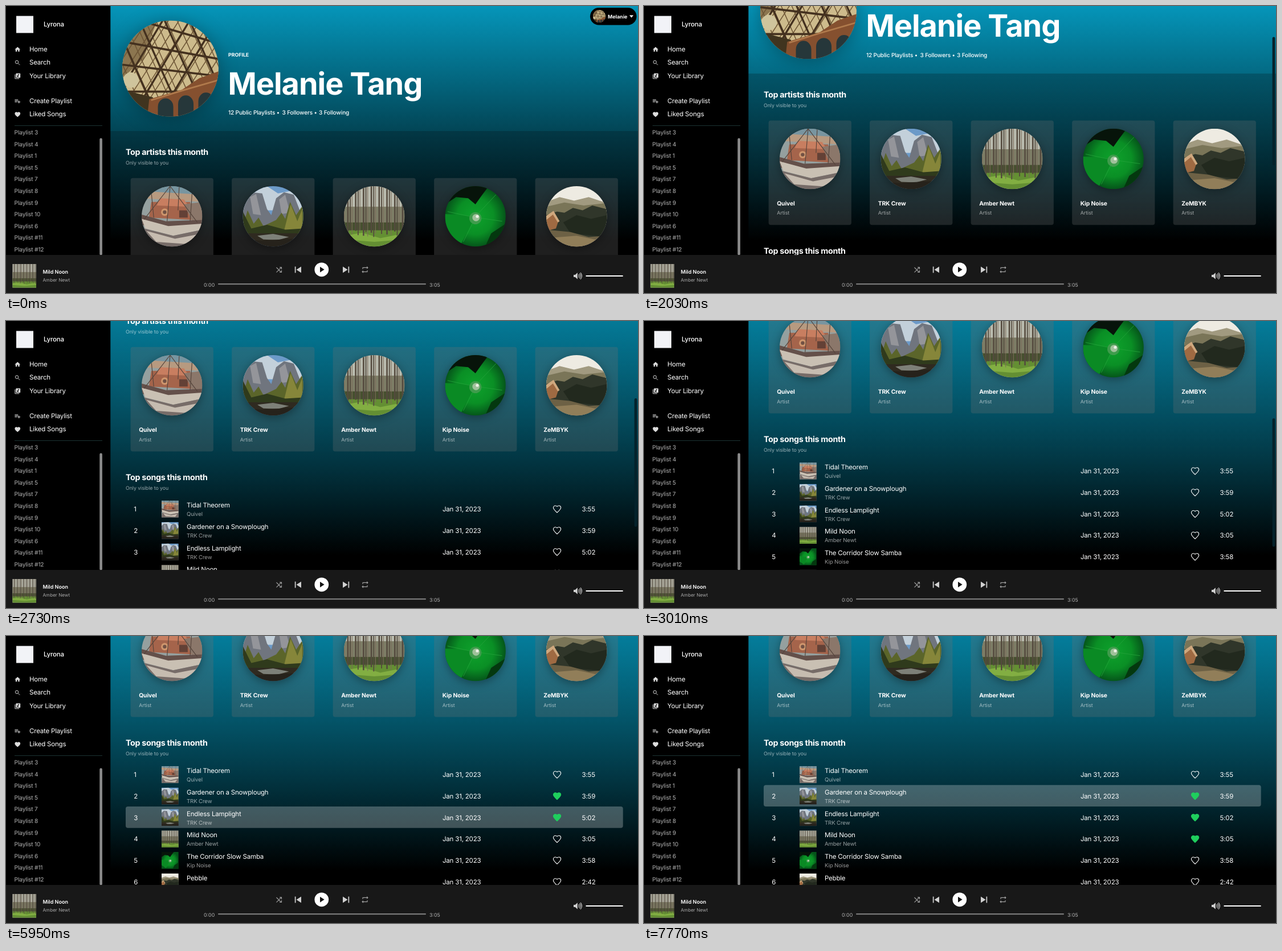
An HTML page that plays this animation: 1109 px wide and 505 px high, repeating every 8 s.

```html
<!DOCTYPE html>
<html lang="en">
<head>
<meta charset="utf-8">
<title>Music profile</title>
<style>
  html, body { margin: 0; width: 100%; height: 100%; overflow: hidden; background: #000; }
  svg { display: block; width: 1109px; height: 505px; }
  text { font-family: Inter, "Noto Sans", sans-serif; text-rendering: geometricPrecision; white-space: pre; }
  .soft { filter: drop-shadow(0 4px 8px rgba(0,0,0,.35)); }
  .wide { filter: drop-shadow(0 3px 16px rgba(0,0,0,.3)); }
</style>
</head>
<body>
<svg id="stage" viewBox="0 0 1109 505"></svg>
<script>
const DIM = '#ffffff99';
const HEART = 'M12 21.35l-1.45-1.32C5.4 15.36 2 12.28 2 8.5 2 5.42 4.42 3 7.5 3c1.74 0 3.41.81 4.5 2.09C13.09 3.81 14.76 3 16.5 3 19.58 3 22 5.42 22 8.5c0 3.78-3.4 6.86-8.55 11.54z';
const ROW = 37.75, LIST_TOP = 569.2;

const range = (n, f) => Array.from({ length: n }, (_, i) => f(i)).join('');
const rect = (x, y, w, h, fill, rx = 0) =>
  `<rect x="${x}" y="${y}" width="${w}" height="${h}" fill="${fill}" rx="${rx}"/>`;
const disc = (x, y, r, fill) => `<circle cx="${x}" cy="${y}" r="${r}" fill="${fill}"/>`;
const path = (d, fill) => `<path d="${d}" fill="${fill}"/>`;
const line = (d, stroke, width) => `<path d="${d}" fill="none" stroke="${stroke}" stroke-width="${width}"/>`;
const text = (x, y, s, size = 11.5, gap = -.2, weight = 400, fill = '#fff') =>
  `<text x="${x}" y="${y}" font-size="${size}" letter-spacing="${gap}" font-weight="${weight}" fill="${fill}">${s}</text>`;
const at = (x, y, scale, body) => `<g transform="translate(${x} ${y}) scale(${scale})">${body}</g>`;
const pic = (id, x, y, size, clip = 'round') =>
  `<g transform="translate(${x} ${y}) scale(${size / 100})" clip-path="url(#${clip})"><use href="#${id}"/></g>`;

// Simplified pictures, each on a 100 x 100 field
const pictures = {
  bridge: rect(0, 0, 100, 100, '#cdbb8c') + path('M0 0H36L22 40 0 60z', '#8c7650') +
    range(12, i => line(`M${i * 11 - 20} 0L${i * 11 + 18} 86M${i * 11 + 4} 0L${i * 11 - 50} 84`, '#6d5535', .9)) +
    range(4, i => line(`M${i * 26 - 8} 0L${i * 26 + 30} 86M${i * 28 + 14} 0L${i * 28 - 36} 84`, '#44311f', 2)) +
    line('M0 22L100 40M0 46L100 58M18 0L100 24M0 74L62 74', '#44311f', 2.2) +
    disc(9, 62, 8, '#cfc49c') + path('M0 72L32 80 30 100H0z', '#40341f') +
    path('M28 82L62 72 80 60 100 53V100H26z', '#85502f') + line('M30 83L62 73 100 62', '#b07a4c', 1.6) +
    [45, 66, 87].map((x, i) => path(`M${x - 8} 100V${90 - i * 3}a8 9 0 0 1 16 0V100z`, '#26373a')).join(''),
  boat: rect(0, 0, 100, 100, '#95a09f') + rect(0, 0, 100, 18, '#7895a0') +
    path('M0 8L100 14V26L0 20z', '#b79a80') + path('M16 26H80L86 56 12 52z', '#a5644b') +
    path('M30 20L70 22 78 34 25 32z', '#c87e60') + rect(62, 40, 14, 12, '#634136') +
    disc(38, 43, 6, '#cf966d') + disc(38, 43, 3, '#715144') +
    path('M70 30L100 26V56L84 60z', '#8b776a') +
    path('M0 47L40 58 100 56V70L60 78 0 64z', '#64504a') + path('M0 54L44 66 100 62V72L52 82 6 70z', '#c9c0b3') +
    path('M4 70L52 82 100 72V100H0z', '#776c68') + path('M8 74L55 87 92 80 80 96 24 92z', '#c6bcb0') +
    line('M47 0L42 58M15 0L20 52M84 0L80 58M47 0L92 60M47 0L4 55M62 0L60 40', '#55443b', 1.1),
  valley: rect(0, 0, 100, 100, '#6c9ac8') + path('M0 4L40 0 58 12 88 6 100 22V40H0z', '#c3d0da') +
    path('M0 22L14 10 32 12 40 38 47 48 55 20 68 10 84 14 94 40V66H0z', '#70757e') +
    path('M12 18L22 13 30 48 17 46zM60 22L70 14 78 44 64 46z', '#94959a') +
    path('M0 66L8 40 18 62 26 52 34 66 55 56 64 44 70 54 78 26 88 48 100 30V78H0z', '#5b652a') +
    path('M68 74L79 30 90 58 98 38V80z', '#86863a') + path('M0 42L14 70 40 64 70 72 100 70V84H0z', '#2f3a1c') +
    rect(0, 78, 100, 22, '#2f2a20') + path('M24 82L50 79 76 84 58 89 34 88z', '#7d8078') +
    path('M0 88L30 90 100 86V100H0z', '#26221b'),
  forest: rect(0, 0, 100, 100, '#b9bbae') + rect(0, 34, 100, 40, '#7d7d66') + rect(0, 60, 100, 14, '#46502f') +
    rect(0, 73, 100, 27, '#648f33') + path('M0 82L30 77 60 86 100 78V88L50 92 0 88z', '#82ae42') +
    range(24, i => rect(i * 4.3 + i * i % 3, 0, 1 + i * 5 % 3 * .7, 72 + i * 7 % 13, i % 3 ? '#544a3e' : '#7b6b5a')),
  leaf: rect(0, 0, 100, 100, 'url(#lush)') + path('M0 0H72L60 16 50 30 38 20 18 18 0 30z', '#07140a') +
    path('M50 50L0 46V78L26 96z', '#0a8a24') + path('M100 62L76 78 66 100H100z', '#04380f') +
    line('M50 50L84 14M50 52L4 42M50 52L30 92M52 52L94 58', '#24a23a', .8) +
    disc(50, 53, 10, '#3f9c4c') + disc(51, 52, 6, '#9fc19a') + disc(53, 50, 2.4, '#edf2e6'),
  hills: rect(0, 0, 100, 100, '#eeebe2') + path('M0 26L22 18 46 24 70 18 100 28V60H0z', '#a19a80') +
    path('M0 34L30 27 62 32 100 28V60H0z', '#7a7558') +
    path('M0 48L18 42 30 44 44 36 60 40 76 32 100 38V86H0z', '#30362a') +
    path('M28 60L50 48 74 54 100 48V84L40 78z', '#22291e') +
    path('M0 72L40 76 70 84 100 82V100H0z', '#6d6145') + path('M0 86L50 82 100 92V100H0z', '#917e59') +
    path('M0 52L12 44 20 58 16 70 0 74z', '#9f6a42') + path('M0 49L12 41 22 58 19 60 11 47 0 56z', '#cfa87e')
};

const artists = [['Quivel', 'boat'], ['TRK Crew', 'valley'], ['Amber Newt', 'forest'], ['Kip Noise', 'leaf'], ['ZeMBYK', 'hills']];
// title, artist index, length, time of the like
const songs = [
  ['Tidal Theorem', 0, '3:55'], ['Gardener on a Snowplough', 1, '3:59', 4900],
  ['Endless Lamplight', 1, '5:02', 5950], ['Mild Noon', 2, '3:05', 7210],
  ['The Corridor Slow Samba', 3, '3:58'], ['Pebble', 4, '2:42']
];

const card = ([name, photo], i) => {
  const x = 218.6 + i * 177.5;
  return rect(x, 302.7, 145.3, 183.7, 'rgba(112,112,112,.28)', 4) +
    `<g class="soft">${pic(photo, x + 19.4, 317, 106.4)}</g>` +
    text(x + 14.6, 452, name, 10.3, -.1, 700) + text(x + 14.6, 468.6, 'Artist', 8.8, 0, 400, DIM);
};

const songRow = ([title, artist, length], i) => {
  const y = LIST_TOP + i * ROW, [name, photo] = artists[artist];
  return `<rect class="glow" x="210" y="${y - .7}" width="872.7" height="${ROW}" rx="4" fill="#fff" opacity="0"/>` +
    text(224.3, y + 22.8, i + 1) + pic(photo, 273, y + 3.8, 29.8, 'square') +
    text(317, y + 15.8, title) + text(317, y + 30.8, name, 9.6, -.1, 400, DIM) +
    text(766, y + 22.8, 'Jan 31, 2023') +
    at(959.1, y + 10.8, .66, `<path class="heart" d="${HEART}" stroke-width="1.7"/>`) +
    text(1010.6, y + 22.8, length);
};

const page =
  rect(183, 220, 926, 562, 'url(#veil)') +
  `<g class="wide">${pic('bridge', 204, 25.5, 169)}</g>` +
  text(390, 88.7, 'PROFILE', 8.8, 0, 700) +
  text(389.5, 155.5, 'Melanie Tang', 54, -1, 700) +
  text(390, 191.2, '12 Public Playlists •', 10.1, -.16, 500) +
  text(484.5, 191.2, '3 Followers •', 10.1, -.16, 500) + text(549, 191.2, '3 Following', 10.1, -.16, 500) +
  rect(1025, 3, 81.5, 30.6, '#000', 15.3) + pic('bridge', 1030, 7, 22) +
  text(1056, 21.7, 'Melanie', 8.9, 0, 700) + path('M1094 16.3h7l-3.5 4.2z', '#fff') +
  text(210, 262.4, 'Top artists this month', 14.3, -.32, 700) +
  text(210, 279.4, 'Only visible to you', 8.8, -.06, 400, DIM) +
  artists.map(card).join('') +
  text(210, 537, 'Top songs this month', 14.3, -.32, 700) +
  text(210, 554.2, 'Only visible to you', 8.8, -.06, 400, DIM) +
  songs.map(songRow).join('');

const icons = [
  path('M10 20v-6h4v6h5v-8h3L12 3 2 12h3v8z', '#ddd'),
  line('M14.5 14.5L20 20M15 9.5a5.5 5.5 0 1 0-11 0a5.5 5.5 0 1 0 11 0', '#ddd', 2),
  rect(6, 2, 16, 16, '#ddd', 2) + line('M3 6V21H18', '#ddd', 2) + disc(12.5, 12.5, 2.5, '#000') + line('M14 12.5V6H18', '#000', 2),
  line('M2 7H14M2 11H14M2 15H10M17 10V20M12 15H22', '#ddd', 2),
  path(HEART, '#ddd')
];
const menu = ['Home', 'Search', 'Your Library', 'Create Playlist', 'Liked Songs'];
const menuY = [75.5, 99, 122.5, 166.5, 190];
const playlists = ['3', '4', '1', '5', '7', '8', '9', '10', '6', '#11', '#12'];

const sidebar =
  rect(0, 0, 183.3, 438, '#000') + rect(18, 17.5, 30, 30, '#f2f3f7') + text(66, 36, 'Lyrona', 11.5, -.2, 500) +
  menu.map((s, i) => at(14.4, menuY[i] - 5, .49, icons[i]) + text(41, menuY[i] + 4, s)).join('') +
  rect(15, 210, 154, .8, '#24403f') +
  playlists.map((s, i) => text(14.6, 226.2 + i * 20.55, 'Playlist ' + s, 10.2, -.15, 400, '#b3b3b3')).join('') +
  rect(164.3, 232.5, 4.6, 206, '#8b8b8b', 2.3);

const player =
  rect(0, 438, 1109, 67, '#181818') + pic('forest', 11.3, 454, 41.8, 'square') +
  text(64.5, 471.2, 'Mild Noon', 9.1, 0, 600) + text(64.5, 485.4, 'Amber Newt', 8.1, 0, 400, '#aaa') +
  line('M474.5 460L483 468.6M474.5 468.6L483 460M480 459.7h3.5v3.5M480 468.5h3.5v-3.5', '#a0a0a0', 1.1) +
  rect(506.8, 458.5, 1.7, 11, '#d0d0d0') + path('M518 458.5v11l-8.5-5.5z', '#d0d0d0') +
  disc(553.8, 463.8, 12.4, '#fff') + path('M551 458.8v10l7.6-5z', '#111') +
  path('M591 458.5v11l8.5-5.5z', '#d0d0d0') + rect(600.5, 458.5, 1.7, 11, '#d0d0d0') +
  line('M626 463v-2.6h8.3M634 465v2.6h-8.3', '#a0a0a0', 1.1) +
  path('M633 458l2.8 2.4-2.8 2.4zM627 465.2l-2.8 2.4 2.8 2.4z', '#a0a0a0') +
  text(347, 493.6, '0:00', 8.8, 0, 400, '#b3b3b3') + rect(372, 488.3, 365, 2, '#858585', 1) +
  text(743, 493.6, '3:05', 8.8, 0, 400, '#b3b3b3') +
  path('M996 473h2.8l4-3.7v11.4l-4-3.7h-2.8z', '#d0d0d0') +
  line('M1004.5 472.3q2.3 2.7 0 5.4M1006.2 470.6q4 4.4 0 8.8M1008 469.2q5 5.8 0 11.6', '#d0d0d0', 1.1) +
  rect(1017.3, 474, 65.5, 2, '#fff', 1);

const stage = document.getElementById('stage');
stage.innerHTML = `<defs>
  <linearGradient id="sky" x2="0" y2="1"><stop stop-color="#0595b9"/><stop offset="1"/></linearGradient>
  <linearGradient id="veil" x2="0" y2="1"><stop stop-opacity=".2"/><stop offset="1" stop-opacity=".04"/></linearGradient>
  <radialGradient id="lush"><stop stop-color="#0ea22c"/><stop offset=".6" stop-color="#0a8f25"/><stop offset="1" stop-color="#05561a"/></radialGradient>
  <clipPath id="round"><circle cx="50" cy="50" r="50"/></clipPath>
  <clipPath id="square"><rect width="100" height="100"/></clipPath>
  ${Object.entries(pictures).map(([id, body]) => `<g id="${id}">${body}</g>`).join('')}
  </defs>` + rect(183, 0, 926, 412, 'url(#sky)') + `<g id="page">${page}</g>` +
  `<rect id="bar" x="1102.6" width="4.8" height="226" rx="2.4" fill="#04222b"/>` + sidebar + player;

const pageEl = document.getElementById('page'), bar = document.getElementById('bar');
const hearts = [...document.querySelectorAll('.heart')], glows = [...document.querySelectorAll('.glow')];

const LOOP = 8000, TICK = 70;
const scrollKeys = [[0, 0], [1750, 0], [1820, 24.3], [2240, 178], [2380, 222], [2590, 248], [2660, 248], [2730, 257], [2870, 294], [3010, 324], [3150, 344], [LOOP, 344]];
// row, pointer enters, pointer leaves
const hovers = [[1, 3150, 5110], [2, 5110, 6300], [3, 6300, 7560], [2, 7560, 7630], [1, 7630, LOOP]];
const clamp = v => Math.min(1, Math.max(0, v));

function scrollAt(t) {
  const i = scrollKeys.findIndex(k => k[0] > t);
  const [t0, y0] = scrollKeys[i - 1], [t1, y1] = scrollKeys[i];
  return y0 + (y1 - y0) * (t - t0) / (t1 - t0);
}

function draw(now) {
  const t = Math.floor(now % LOOP / TICK) * TICK;
  const y = scrollAt(t);
  pageEl.setAttribute('transform', `translate(0 ${-y})`);
  bar.setAttribute('y', 1.7 + y * .523);
  bar.setAttribute('opacity', t < 1820 ? 0 : clamp(1 - (t - 3640) / 280));

  const ramp = start => clamp((t - start + TICK) / (3 * TICK));
  const glow = songs.map(() => 0);
  if (t >= 3290) for (const [row, enter, leave] of hovers)
    glow[row] = Math.max(glow[row], ramp(enter) - ramp(leave));
  glows.forEach((el, i) => el.setAttribute('opacity', glow[i] * .25));

  hearts.forEach((el, i) => {
    const liked = t >= songs[i][3];
    el.setAttribute('fill', liked ? '#1fce5d' : 'none');
    el.setAttribute('stroke', liked ? '#1fce5d' : '#fff');
  });
  requestAnimationFrame(draw);
}
requestAnimationFrame(draw);
</script>
</body>
</html>
```
